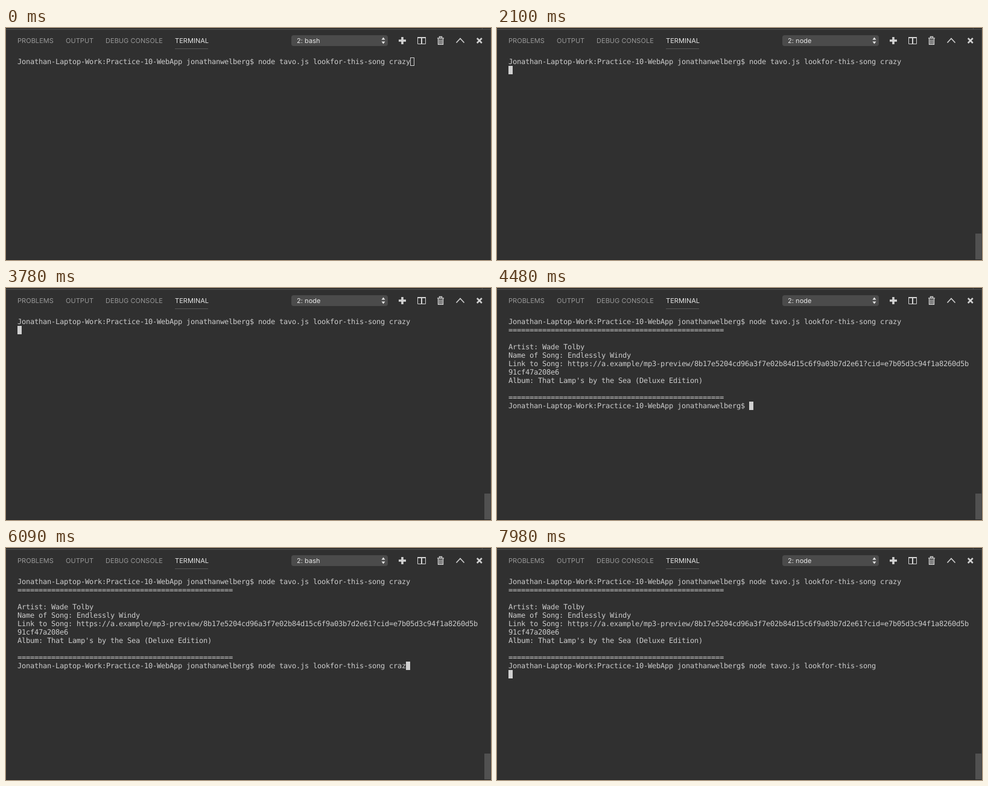
An HTML page for the animation above (8 s loop, 804x386 px).

```html
<!DOCTYPE html>
<html lang="en">
<head>
<meta charset="utf-8">
<title>Terminal</title>
<style>
  html, body { margin: 0; width: 100%; height: 100%; overflow: hidden; background: #303030; }
  svg { display: block; width: 804px; height: 386px; text-rendering: geometricPrecision; }
  .ui { font: 11px Inter, "Open Sans", sans-serif; letter-spacing: .04px; fill: #989898; }
  .bright { fill: #e6e6e6; }
  #screen { font: 12px "DejaVu Sans Mono", monospace; fill: #ccc; }
  #screen text { white-space: pre; }
  .icon { fill: none; stroke: #d2d2d2; }
</style>
</head>
<body>
<svg viewBox="0 0 804 386">
  <rect width="804" height="386" fill="#303030"/>
  <path d="M0 2.5H804" stroke="#505050"/>
  <path d="M789.5 0V2" stroke="#484848"/>
  <path d="M0 385.5H804" stroke="#272727"/>
  <path d="M803.5 3V386" stroke="#414141"/>

  <g class="ui">
    <text x="19" y="25">PROBLEMS</text>
    <text x="99" y="25">OUTPUT</text>
    <text x="165" y="25">DEBUG CONSOLE</text>
    <text x="280" y="25" class="bright">TERMINAL</text>
    <path d="M280 34.5H335" stroke="#565656"/>
    <rect x="473" y="12" width="160" height="18" rx="4" fill="#4b4b4b"/>
    <text id="shell" x="482" y="25" class="bright"></text>
    <path class="bright" d="M622.5 19.5L625.5 15.5L628.5 19.5ZM622.5 22.5L625.5 26.5L628.5 22.5Z"/>
  </g>

  <g class="icon">
    <path d="M651 21H663M657 15V27" stroke-width="3.6"/>
    <path d="M682.5 15.5H695.5V26.5H682.5Z"/>
    <path d="M682 16H696M689 16V26" stroke-width="2"/>
    <path d="M715 17H726M718.5 16V14.5H722.5V16" stroke-width="1.5"/>
    <path d="M716.5 18V27.2H724.5V18" stroke-width="1.4"/>
    <path d="M718.5 19V26M720.5 19V26M722.5 19V26"/>
    <path d="M746.5 24.5L753 17.5L759.5 24.5" stroke-width="1.6"/>
    <path d="M780.8 17L788.8 25M788.8 17L780.8 25" stroke-width="2.5"/>
  </g>

  <g id="screen"></g>
  <rect id="cursor" stroke="#d0d0d0"/>
  <rect id="scrollbar" x="793" y="342" width="10" height="43" fill="#515151"/>
</svg>

<script>
const LOOP = 8000, CELL = 7, LINE = 14, LEFT = 19, TOP = 49;
const byId = id => document.getElementById(id);
const [shell, screen, cursor, scrollbar] = ['shell', 'screen', 'cursor', 'scrollbar'].map(byId);

const prompt = 'Jonathan-Laptop-Work:Practice-10-WebApp jonathanwelberg$ ';
const command = prompt + 'node tavo.js lookfor-this-song ';
const query = command + 'crazy';
const rule = '='.repeat(51);
const scheme = 'https';
const output = [
  query, rule, '',
  'Artist: Wade Tolby',
  'Name of Song: Endlessly Windy',
  `Link to Song: ${scheme}://a.example/mp3-preview/8b17e5204cd96a3f7e02b84d15c6f9a03b7d2e61?cid=e7b05d3c94f1a8260d5b`,
  '91cf47a208e6',
  "Album: That Lamp's by the Sea (Deluxe Edition)",
  '', rule
];
const after = (...lines) => [...output, ...lines];

// start time, shell name, lines (the cursor follows the last one)
const steps = [
  [0, 'bash', [query]],
  [1260, 'bash', [query, '']],
  [1330, 'node', [query, '']],
  [4480, 'node', after(prompt)],
  [4550, 'bash', after(prompt)],
  [5180, 'bash', after(query)],
  [6090, 'bash', after(command + 'craz')],
  [6230, 'bash', after(command + 'cra')],
  [6440, 'bash', after(command + 'cr')],
  [6580, 'bash', after(command + 'c')],
  [6720, 'bash', after(command)],
  [7350, 'bash', after(command, '')],
  [7490, 'node', after(command, '')]
];

const setAll = (el, attrs) => {
  for (const name in attrs) el.setAttribute(name, attrs[name]);
};

const rows = Array.from({ length: 12 }, (_, i) => {
  const row = document.createElementNS(screen.namespaceURI, 'text');
  row.setAttribute('y', TOP + LINE * i + 11);
  return screen.appendChild(row);
});

function showStep([, name, lines]) {
  shell.textContent = '2: ' + name;
  rows.forEach((row, i) => {
    const line = lines[i] || '';
    if (row.textContent === line) return;
    row.setAttribute('x', [...line].map((_, col) => LEFT + CELL * col).join(' '));
    row.textContent = line;
  });
  const last = lines.length - 1;
  setAll(cursor, {
    x: LEFT + CELL * lines[last].length + .5,
    y: TOP + LINE * last + .5,
    width: CELL - 1,
    height: LINE - 1
  });
}

let current;
function draw(t) {
  const step = steps.findLast(([start]) => start <= t);
  if (step !== current) showStep(current = step);
  cursor.setAttribute('fill', t < 70 ? 'none' : '#d0d0d0');
  scrollbar.setAttribute('opacity', Math.min(1, Math.max(0, (t - 70) / 560)));
}

const begin = performance.now();
function tick() {
  draw((performance.now() - begin) % LOOP);
  requestAnimationFrame(tick);
}
tick();
</script>
</body>
</html>
```
